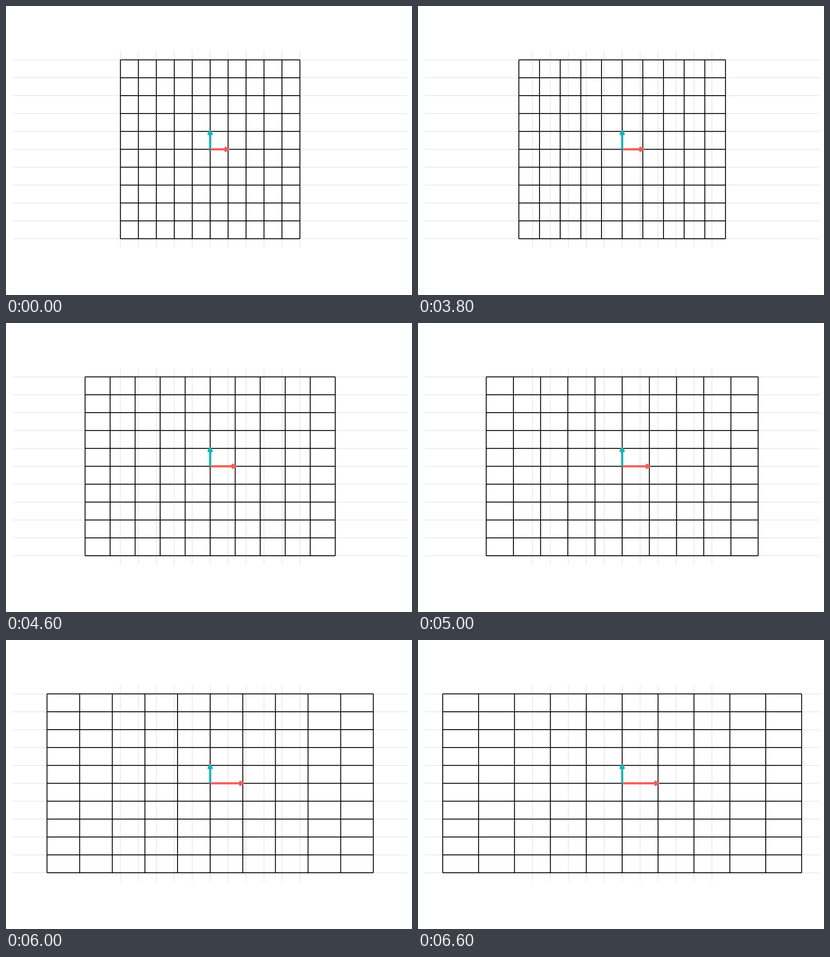
A matplotlib script that plays this animation: 885x632 px, repeating every 10000 ms.

```python
import numpy as np
import matplotlib.pyplot as plt
from matplotlib.animation import FuncAnimation
from matplotlib.collections import LineCollection

WIDTH, HEIGHT, DPI = 885, 632, 100
CX, CY, UNIT = 445.05, 313.4, 39.12
FRAMES, INTERVAL = 100, 100
HOLD, STEPS = 33, 33          # frames at rest, then frames of stretching
LINE, ARROW = 1.9, 4.75       # stroke widths in pixels
HEAD = 7.56
TICKS = np.arange(-5, 6)

fig = plt.figure(figsize=(WIDTH / DPI, HEIGHT / DPI), dpi=DPI, facecolor="white")
ax = fig.add_axes([0, 0, 1, 1])
ax.set_xlim(0, WIDTH)
ax.set_ylim(HEIGHT, 0)
ax.axis("off")


def points(pixels):
    return pixels * 72 / DPI


def to_pixels(x, y):
    return CX + UNIT * x, CY - UNIT * y


def grid(x_reach, y_reach, x_scale=1):
    """Segments of an 11 by 11 grid, reaching out from the centre."""
    rows = [(to_pixels(-x_reach, t), to_pixels(x_reach, t)) for t in TICKS]
    cols = [(to_pixels(t * x_scale, -y_reach), to_pixels(t * x_scale, y_reach))
            for t in TICKS]
    return rows + cols


def add_grid(segments, color, zorder):
    lines = LineCollection(segments, colors=color, linewidths=points(LINE),
                           capstyle="butt", zorder=zorder)
    lines.set_snap(False)
    return ax.add_collection(lines, autolim=False)


def add_arrow(color, zorder):
    style = dict(color=color, lw=points(ARROW), solid_capstyle="butt",
                 solid_joinstyle="round", zorder=zorder, snap=False)
    return [ax.plot([], [], **style)[0] for _ in range(2)]


def place_arrow(arrow, x, y):
    """Point an arrow from the origin to (x, y) with an open 30 degree head."""
    start, tip = np.array(to_pixels(0, 0)), np.array(to_pixels(x, y))
    along = (tip - start) / np.hypot(*(tip - start))
    across = np.array([-along[1], along[0]]) * HEAD * np.tan(np.pi / 6)
    back = tip - along * HEAD
    shaft, head = arrow
    shaft.set_data(*zip(start, tip))
    head.set_data(*zip(back + across, tip, back - across))


add_grid(grid(11, 5.5), "#EBEBEB", 1)
moving_grid = add_grid(grid(5, 5), "black", 2)
x_arrow = add_arrow("#F35E5A", 3)
y_arrow = add_arrow("#17B3B7", 4)
place_arrow(y_arrow, 0, 1)


def update(frame):
    scale = 1 + np.clip(frame - HOLD, 0, STEPS) / STEPS
    moving_grid.set_segments(grid(5 * scale, 5, scale))
    place_arrow(x_arrow, scale, 0)
    return [moving_grid, *x_arrow, *y_arrow]


anim = FuncAnimation(fig, update, frames=FRAMES, interval=INTERVAL,
                     repeat=True, repeat_delay=0, blit=False)
plt.show()
```
